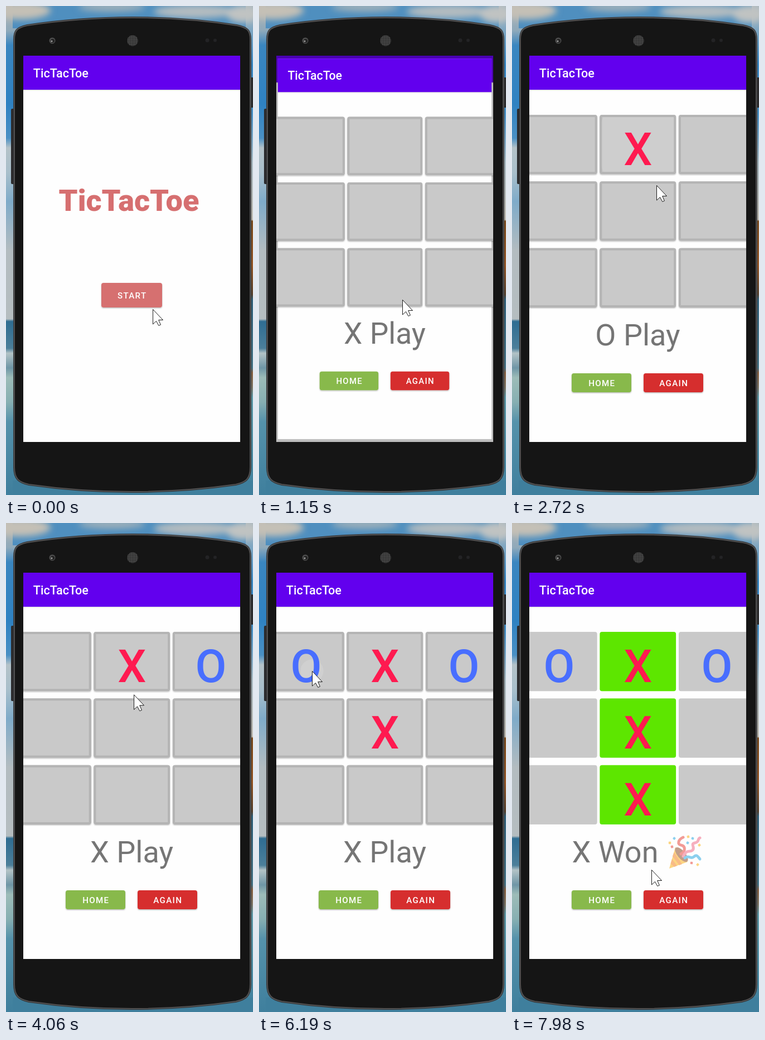
An HTML page for the animation above (8000 ms loop, 443 by 876 pixels).

```html
<!DOCTYPE html>
<html lang="en">
<head>
<meta charset="utf-8">
<title>TicTacToe</title>
<style>
html, body { margin: 0; width: 100%; height: 100%; overflow: hidden; background: #2f7fbd; }
svg { display: block; width: 443px; height: 876px; font-family: Roboto, sans-serif; }
.bar { font-size: 21.6px; font-weight: 500; fill: #fff; }
.logo { font-size: 54px; font-weight: 900; fill: #d66f70; text-anchor: middle; }
.label { font-size: 15.1px; font-weight: 500; letter-spacing: 1.35px; fill: #fff; text-anchor: middle; }
.status { font-size: 54px; fill: #757575; }
.mark { font-size: 81px; font-weight: 500; text-anchor: middle; }
</style>
</head>
<body>
<svg viewBox="0 0 443 876">
  <defs>
    <linearGradient id="left" x2="0" y2="1">
      <stop offset="0" stop-color="#aeb4b6"/><stop offset=".05" stop-color="#8fa9ba"/>
      <stop offset=".08" stop-color="#3a86c0"/><stop offset=".2" stop-color="#2f82c2"/>
      <stop offset=".27" stop-color="#4a90c4"/><stop offset=".29" stop-color="#b4c2c8"/>
      <stop offset=".34" stop-color="#a9bfcb"/><stop offset=".4" stop-color="#7fabc9"/>
      <stop offset=".5" stop-color="#b3bcc0"/><stop offset=".64" stop-color="#b5bdc0"/>
      <stop offset=".645" stop-color="#2f6d92"/><stop offset=".7" stop-color="#4c7f9a"/>
      <stop offset=".71" stop-color="#b3c3c6"/><stop offset=".74" stop-color="#6f96a6"/>
      <stop offset=".76" stop-color="#9dbcb8"/><stop offset=".81" stop-color="#87afb2"/>
      <stop offset=".85" stop-color="#5592ab"/><stop offset="1" stop-color="#3f7f9d"/>
    </linearGradient>
    <linearGradient id="right" x2="0" y2="1">
      <stop offset="0" stop-color="#a3b4be"/><stop offset=".05" stop-color="#7ea6c2"/>
      <stop offset=".12" stop-color="#3a86c0"/><stop offset=".22" stop-color="#4a8fc2"/>
      <stop offset=".32" stop-color="#a9b9c1"/><stop offset=".437" stop-color="#bdbab2"/>
      <stop offset=".44" stop-color="#7d4f24"/><stop offset=".53" stop-color="#95592b"/>
      <stop offset=".59" stop-color="#5a4634"/><stop offset=".6" stop-color="#35637c"/>
      <stop offset=".74" stop-color="#4a7688"/><stop offset=".75" stop-color="#8a6548"/>
      <stop offset=".78" stop-color="#80796a"/><stop offset=".8" stop-color="#5f98a6"/><stop offset="1" stop-color="#3f7f9d"/>
    </linearGradient>
    <pattern id="mesh" width="3" height="3" patternUnits="userSpaceOnUse">
      <rect width="3" height="3" fill="#4b4b4b"/><circle cx="1.5" cy="1.5" r=".9" fill="#1c1c1c"/>
    </pattern>
    <filter id="soft" x="-10%" y="-10%" width="120%" height="130%">
      <feDropShadow dx="0" dy="1.2" stdDeviation="1" flood-opacity=".3"/>
    </filter>
    <filter id="haze" x="-30%" y="-60%" width="160%" height="220%"><feGaussianBlur stdDeviation="6"/></filter>
    <clipPath id="screen"><rect x="31" y="89" width="389" height="692"/></clipPath>
    <clipPath id="tap"><rect id="tapBox" rx="3"/></clipPath>
    <g id="appBar">
      <rect x="31" y="89" width="389" height="692" fill="#fefefe"/>
      <rect x="31" y="89" width="389" height="61" fill="#6200ee"/>
      <rect x="31" y="150" width="389" height="1.500" fill="#000" opacity=".1"/>
      <text class="bar" x="48.800" y="127.700">TicTacToe</text>
    </g>
    <path id="body" d="M15 60C15 45 19 39 38 35Q130 21 227 21T414 35C434 39 438 45 438 60V826C438 847 430 853 412 857Q320 870 226 870T41 857C23 853 15 847 15 826Z"/>
  </defs>

  <rect width="222" height="876" fill="url(#left)"/>
  <rect x="222" width="221" height="876" fill="url(#right)"/>
  <rect x="12" width="418" height="40" fill="#4f8fbf"/>
  <g filter="url(#haze)">
    <ellipse cx="25" cy="8" rx="55" ry="16" fill="#c4c0b6"/>
    <ellipse cx="190" cy="2" rx="60" ry="8" fill="#9fb0ba"/>
    <ellipse cx="340" cy="10" rx="75" ry="12" fill="#b3bcc0"/>
    <ellipse cx="425" cy="14" rx="30" ry="16" fill="#c0c3c2"/>
  </g>
  <rect x="12" y="850" width="431" height="26" fill="#3f7f9d"/>

  <rect x="9" y="184" width="6" height="135" rx="2" fill="#2c2c2e"/>
  <rect x="437" y="128" width="8" height="54" rx="2" fill="#2c2c2e"/>
  <use href="#body" stroke="#333334" stroke-width="4"/>
  <use href="#body" fill="#151515" stroke="#515152" stroke-width="2"/>
  <circle cx="83" cy="62" r="5.500" fill="#4d4d4d"/>
  <circle cx="83.500" cy="62.500" r="3.500" fill="#222"/>
  <circle cx="82" cy="63" r="1.500" fill="#a8a8a8"/>
  <circle cx="227" cy="62" r="9.800" fill="url(#mesh)"/>
  <g fill="#232325"><circle cx="361" cy="61.500" r="3.500"/><circle cx="375" cy="61.500" r="3"/></g>

  <g clip-path="url(#screen)">
    <rect x="31" y="89" width="389" height="692" fill="#fefefe"/>
    <g id="home">
      <use href="#appBar"/>
      <text class="logo" x="220.500" y="367.300">TicTacToe</text>
      <rect x="171" y="496" width="109" height="44" rx="4" fill="#d66f70" filter="url(#soft)"/>
      <text class="label" x="226.300" y="523.700">START</text>
    </g>
    <rect id="shade" x="31" y="89" width="389" height="692"/>
    <g id="game">
      <use href="#appBar"/>
      <g id="cells"></g>
      <text id="status" class="status" y="607.500"></text>
      <g id="party" opacity=".53">
        <path d="M282 619L293 581Q304 586 315 607Z" fill="#fbb116"/>
        <path d="M287 602L296 614L291 616L284.500 610Z" fill="#f4811f"/>
        <path d="M290.500 590L305 611L300 613L288 597Z" fill="#f4811f"/>
        <ellipse cx="304" cy="594" rx="7" ry="16" transform="rotate(-40 304 594)" fill="#8c4a25"/>
        <g fill="none" stroke-width="5" stroke-linecap="round">
          <path d="M303 593C313 587 310 578 303 577S298 567 307 563" stroke="#e8453c"/>
          <path d="M307 597C315 583 319 591 324 586S319 575 328 573S332 566 337 564" stroke="#f06a86"/>
          <path d="M310 600C317 594 321 603 326 598S333 597 337 602" stroke="#29a8e0"/>
        </g>
        <g id="bits"></g>
      </g>
      <rect x="107" y="658" width="107" height="34" rx="4" fill="#88b94c" filter="url(#soft)"/>
      <rect x="236" y="658" width="107" height="34" rx="4" fill="#d62d2d" filter="url(#soft)"/>
      <text class="label" x="161.300" y="681">HOME</text>
      <text class="label" x="290.300" y="681">AGAIN</text>
    </g>
    <g clip-path="url(#tap)"><circle id="ripple" fill="#fff"/></g>
    <g id="marks"></g>
  </g>
  <path id="cursor" d="M.5 .5V27L6.500 21.500L10.800 29.500L14.400 28L10.700 19.500H18.500Z" fill="#fff" stroke="#111" stroke-width=".95"/>
</svg>
<script>
const LOOP = 8000, START = 410, OPEN = 1010, WIN = 7080;
const NS = 'http://www.w3.org/2000/svg';
const $ = id => document.getElementById(id);
const COLS = [16, 157.4, 299], ROWS = [195, 314.2, 433.7];
const CELL_W = 136.7, CELL_H = 106.3;

// time, cell index, mark
const moves = [[2580, 1, 'X'], [3530, 2, 'O'], [4400, 4, 'X'], [6190, 0, 'O'], [WIN, 7, 'X']];

// time, x, y
const track = [
  [0, 263, 543], [60, 263, 543], [210, 257, 526], [1700, 257, 526],
  [1830, 180, 450], [2030, 57, 300], [2200, 130, 170], [2300, 215, 147],
  [2430, 290, 190], [2520, 262, 240], [2600, 262, 250], [2720, 259, 321],
  [3130, 259, 321], [3420, 351, 262], [3940, 351, 258], [4060, 229, 307],
  [4260, 240, 350], [4700, 240, 362], [4760, 282, 368], [4829, 282, 368],
  [4830, 419, 367], [4970, 419, 367], [5240, 334, 381], [5520, 340, 394],
  [5990, 340, 394], [6150, 95, 265], [6540, 95, 265], [6870, 222, 447],
  [7010, 239, 480], [7700, 239, 480], [7840, 255, 560], [7980, 250, 621]
];
const newScale = [[OPEN, .9], [1080, .955], [1150, .985], [1220, .994], [1370, 1]];
const oldScale = [[OPEN, 1.01], [1080, 1.03], [1150, 1.046], [1370, 1.06]];
const newAlpha = [[OPEN, .3], [1080, .85], [1130, 1]];
const dim = [[OPEN - 1, 0], [OPEN, .06], [1150, .26]];

function at(keys, t, col = 1) {
  const n = keys.findIndex(k => k[0] > t);
  if (n < 0) return keys[keys.length - 1][col];
  if (n === 0) return keys[0][col];
  const a = keys[n - 1], b = keys[n];
  return a[col] + (b[col] - a[col]) * (t - a[0]) / (b[0] - a[0]);
}

function add(parent, tag, attrs) {
  const el = document.createElementNS(NS, tag);
  set(el, attrs);
  return parent.appendChild(el);
}

function set(el, attrs) {
  for (const k in attrs) el.setAttribute(k, attrs[k]);
}

const cells = Array.from({ length: 9 }, (_, i) => {
  const x = COLS[i % 3], y = ROWS[i / 3 | 0];
  const box = add($('cells'), 'rect', { x, y, width: CELL_W, height: CELL_H, rx: 4 });
  const rim = add($('cells'), 'rect', {
    x: x + 2, y: y + 2, width: CELL_W - 4, height: CELL_H - 4, rx: 2,
    fill: 'none', stroke: '#b4b4b4', 'stroke-width': 4
  });
  const mark = add($('marks'), 'text', { class: 'mark', x: x + CELL_W / 2 + .1, y: y + 90 });
  return { x, y, box, rim, mark };
});

const bits = [[283, 573, '#fbb116'], [291, 565, '#29a8e0'], [316, 562, '#fbb116'], [324, 565, '#29a8e0'],
  [336, 577, '#fbb116'], [322, 609, '#e8453c'], [333, 612, '#fbb116'], [287, 580, '#e8453c'], [315, 573, '#29a8e0']];
bits.forEach(([x, y, fill], i) => add($('bits'), 'rect', {
  x: x - 2.2, y: y - 2.2, width: 4.4, height: 4.4, rx: 1, fill, transform: `rotate(${i * 37} ${x} ${y})`
}));

const taps = [[START, 171, 496, 109, 44],
  ...moves.map(([t, i]) => [t, cells[i].x + 3, cells[i].y + 4, CELL_W - 6, CELL_H - 8])];

function zoom(id, s) {
  $(id).setAttribute('transform', `translate(225.5 435) scale(${s}) translate(-225.5 -435)`);
}

function drawRipple(t) {
  const tap = taps.find(([s]) => t >= s && t < s + 410);
  $('ripple').setAttribute('opacity', 0);
  if (!tap) return;
  const [s, x, y, width, height] = tap, p = (t - s) / 410;
  set($('tapBox'), { x, y, width, height });
  set($('ripple'), {
    cx: at(track, s, 1), cy: at(track, s, 2),
    r: 20 + 130 * Math.min(1, p * 2), opacity: .13 * (1 - p)
  });
}

function draw(t) {
  const open = t >= OPEN, won = t >= WIN;
  const played = moves.filter(m => t >= m[0]);

  zoom('home', open ? at(oldScale, t) : 1);
  zoom('game', at(newScale, t));
  $('game').setAttribute('opacity', open ? at(newAlpha, t) : 0);
  $('shade').setAttribute('opacity', at(dim, t));

  cells.forEach((c, i) => {
    const move = played.find(m => m[1] === i);
    c.mark.textContent = move ? move[2] : '';
    c.mark.setAttribute('fill', move && move[2] === 'X' ? '#ff1a50' : '#486eff');
    c.box.setAttribute('fill', won && i % 3 === 1 ? '#5de600' : '#c9c9c9');
    c.box.setAttribute('filter', won ? 'none' : 'url(#soft)');
    c.rim.setAttribute('opacity', won ? 0 : 1);
  });

  const label = $('status');
  label.textContent = won ? 'X Won' : played.length % 2 ? 'O Play' : 'X Play';
  set(label, { x: won ? 107.5 : 225.5, 'text-anchor': won ? 'start' : 'middle' });
  $('party').setAttribute('visibility', won ? 'visible' : 'hidden');

  drawRipple(t);
  $('cursor').setAttribute('transform', `translate(${at(track, t, 1)} ${at(track, t, 2)})`);
}

const begin = performance.now();
function tick(now) {
  draw(Math.max(0, now - begin) % LOOP);
  requestAnimationFrame(tick);
}
draw(0);
requestAnimationFrame(tick);
</script>
</body>
</html>
```
